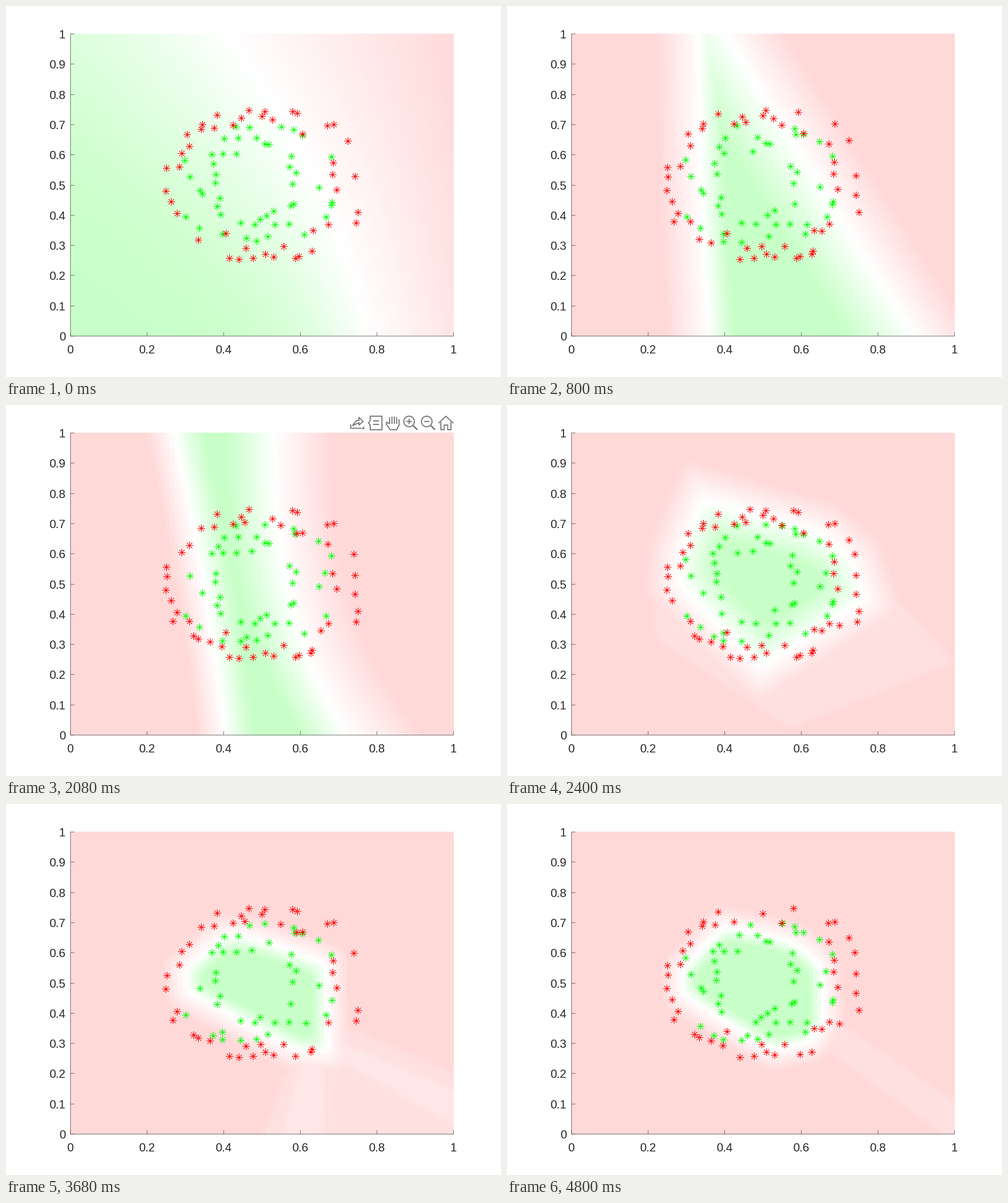
A matplotlib script for the animation above (5.6 s loop, 840 px wide and 630 px high).

```python
import numpy as np
import matplotlib.pyplot as plt
from matplotlib.animation import FuncAnimation
from matplotlib.collections import LineCollection

W, H, DPI = 840, 630, 100
PX = 72 / DPI                       # one pixel in points
L, R, T, B = 109, 760, 47, 561      # plot box in pixels
INK, ICON = "#262626", "#767676"
N = 100                             # background cells per side
plt.rcParams["path.snap"] = False

GX, GY = np.meshgrid(L + (np.arange(N) + .5) * (R - L) / N,
                     T + (np.arange(N) + .5) * (B - T) / N)
U, V = (GX - L) / (R - L), (B - GY) / (B - T)


# ---- background: decision value from -1 (red) to 1 (green) ----

def ramp(d, inner, outer):
    """Signed distance to a value, with its own width on each side."""
    return np.clip(np.where(d > 0, d / inner, d / outer), -1, 1)


def inside(poly, k=5):
    """Rounded signed distance to a convex polygon given clockwise."""
    total = 0
    for (x0, y0), (x1, y1) in zip(poly, poly[1:] + poly[:1]):
        cross = (x1 - x0) * (GY - y0) - (y1 - y0) * (GX - x0)
        total = total + np.exp(-cross / np.hypot(x1 - x0, y1 - y0) / k)
    return -k * np.log(total)


def fade(v, poly, level):
    """Lighten the red to a level inside a polygon."""
    w = np.clip(inside(poly) / 14 + .5, 0, 1)
    return np.maximum(v, -1 + w * (1 + level))


def diagonal():
    d = U - (.777 - .17 * V - .194 * V ** 2)
    green = np.tanh(-d * (1.75 + 2.5 * (1 - V) ** 2))
    return np.where(d < 0, green, -np.clip(d * (3 - 1.4 * V), 0, 1))


def wedge():
    t = 1 - V
    left = ramp(GX - (326 + 18 * t ** 2), 42, 75)
    right = ramp(370 + 322 * t - GX, 115, 105)
    return np.minimum(left, right)


def band():
    t = 1 - V
    left = ramp(GX - (285 + 115 * t - 28 * t ** 2), 50, 50)
    right = ramp(455 + 125 * t ** 2.6 - GX, 80, 100 + 35 * t ** 3)
    return np.minimum(left, right)


def heptagon():
    v = ramp(inside([(333, 160), (535, 218), (585, 262), (607, 330),
                     (432, 445), (292, 305), (293, 255)]), 58, 60)
    return fade(v, [(250, 225), (620, 285), (760, 436), (480, 550), (250, 395)], -.78)


def hull():
    v = ramp(inside([(372, 222), (412, 224), (543, 272), (546, 420),
                     (495, 420), (308, 318), (303, 283)]), 26, 40)
    v = fade(v, [(490, 420), (570, 375), (760, 455), (770, 575), (430, 575)], -.78)
    v = fade(v, [(500, 420), (545, 420), (540, 575), (462, 575)], -.6)
    return fade(v, [(540, 390), (780, 490), (780, 560), (550, 430)], -.6)


def drop():
    v = ramp(inside([(375, 186), (435, 186), (545, 260), (602, 386),
                     (560, 400), (430, 395), (313, 318), (316, 265)]), 34, 42)
    v = fade(v, [(580, 310), (685, 420), (480, 422)], -.68)
    return fade(v, [(480, 400), (520, 400), (540, 575), (475, 575)], -.78)


def shield():
    v = ramp(inside([(368, 208), (490, 235), (533, 275), (538, 370),
                     (515, 405), (450, 418), (300, 325), (295, 285)]), 23, 38)
    return fade(v, [(540, 355), (780, 518), (780, 590), (530, 410)], -.78)


def paint(v):
    pos, neg = np.clip(v, 0, 1), np.clip(-v, 0, 1)
    return np.dstack([255 - 55 * pos, 255 - 39 * neg,
                      255 - 55 * pos - 39 * neg]) / 255


FIELDS = [paint(f()) for f in (diagonal, wedge, band, heptagon, hull, drop, shield)]


# ---- samples: two noisy rings, a random part of them shown per step ----

rng = np.random.default_rng(4)


def ring_of(n, far, depth, cx):
    """Points round a squarish oval, most of them near its rim."""
    a = 2 * np.pi * (np.arange(n) + rng.random(n)) / n
    c, s = np.cos(a), np.sin(a)
    r = (abs(c / 148) ** 2.5 + abs(s / 111) ** 2.5) ** -.4
    r *= far - depth * rng.random(n) ** 2
    return np.column_stack([cx + r * c, 304 - r * s])


RED = ring_of(60, 1.13, .38, 432)
GREEN = ring_of(58, .9, .5, 420)


def sample():
    """Four fifths of each ring, rescaled to the same bounding box."""
    parts = [p[rng.random(len(p)) < .8] for p in (RED, GREEN)]
    both = np.vstack(parts)
    low, high = both.min(axis=0), both.max(axis=0)
    size, centre = np.array([326, 253]), np.array([434, 304])
    return [centre + ((p - low) / (high - low) - .5) * size for p in parts]


def stars(points):
    """Line segments of eight-armed markers on whole pixels."""
    arms = np.array([(6.5, 0), (0, 6.5), (4.5, 4.5), (4.5, -4.5)])
    return [(p - arm, p + arm) for p in np.floor(points) + .5 for arm in arms]


STARS = [[stars(p) for p in sample()] for _ in FIELDS]


# ---- stage ----

fig = plt.figure(figsize=(W / DPI, H / DPI), dpi=DPI, facecolor="white")
ax = fig.add_axes([0, 0, 1, 1])
image = ax.imshow(FIELDS[0], extent=(L, R, B, T), aspect="auto",
                  interpolation="nearest")
ax.set_xlim(0, W)
ax.set_ylim(H, 0)
ax.axis("off")


def line(xs, ys, color=INK, width=1, **kw):
    return ax.plot(xs, ys, color=color, lw=width * PX,
                   solid_capstyle="butt", **kw)[0]


def label(x, y, value, ha):
    ax.text(x, y, f"{value:g}", family="Liberation Sans", size=20 * PX,
            color=INK, ha=ha, va="baseline")


# Axes with inward ticks
line([L + .5, L + .5], [T, B], alpha=.6)
line([L, R], [B - .5, B - .5], alpha=.6)
for i in range(11):
    y = np.floor(B - .5 - i * (B - T - 1) / 10) + .5
    line([L + 1, L + 7], [y, y], alpha=.6)
    label(101, y + 7.5, i / 10, "right")
for i in range(6):
    x = np.floor(L + .5 + i * (R - L - 1) / 5) + .5
    line([x, x], [B - 7, B - 1], alpha=.6)
    label(x - .5, 590, i / 5, "center")


def toolbar():
    """Row of small grey tool icons above the plot."""
    def stroke(*pts, width=1.8):
        return line(*zip(*pts), color=ICON, width=width)

    share = [stroke((585, 33), (585, 39.5), (603, 39.5)),
             stroke((588, 35), (594, 27), (599, 26), (599, 21), (606, 28),
                    (599, 34), (599, 30), (588, 35)),
             *ax.fill([603, 608, 608], [41, 41, 36], color=ICON, lw=0)]
    note = [stroke((618, 27), (618, 19), (638, 19), (638, 42), (618, 42),
                   (618, 34), (615, 30.5), (618, 27))]
    note += [stroke((623, y), (633, y)) for y in (27, 33)]
    hand = [stroke((651, 32), (646, 29), (645, 32), (652, 42), (663, 42),
                   (667, 34), (667, 24))]
    hand += [stroke((x, 32), (x, 19 + abs(x - 657) / 3)) for x in range(651, 667, 4)]
    zoom, a = [stroke((684, 23.5), (684, 32.5))], np.linspace(0, 2 * np.pi, 40)
    for x in (684, 714):
        zoom += [line(x + 9 * np.cos(a), 28 + 9 * np.sin(a), ICON, 1.8),
                 stroke((x - 4.5, 28), (x + 4.5, 28)),
                 stroke((x + 7, 35), (x + 14, 42), width=2.5)]
    home = [stroke((734, 31), (746.5, 19), (759, 31)),
            stroke((738, 29), (738, 42), (743.5, 42), (743.5, 34), (749.5, 34),
                   (749.5, 42), (755, 42), (755, 29))]
    return share + note + hand + zoom + home


icons = toolbar()
red, green = (ax.add_collection(LineCollection([], colors=c, linewidths=PX, zorder=z))
              for c, z in (("#ff0000", 6), ("#00ff00", 5)))


def draw(step):
    image.set_data(FIELDS[step])
    for marks, segments in zip((red, green), STARS[step]):
        marks.set_segments(segments)
    for part in icons:
        part.set_visible(step == 2)
    return [image, red, green, *icons]


anim = FuncAnimation(fig, draw, frames=len(FIELDS), interval=800, repeat=True)
plt.show()
```
